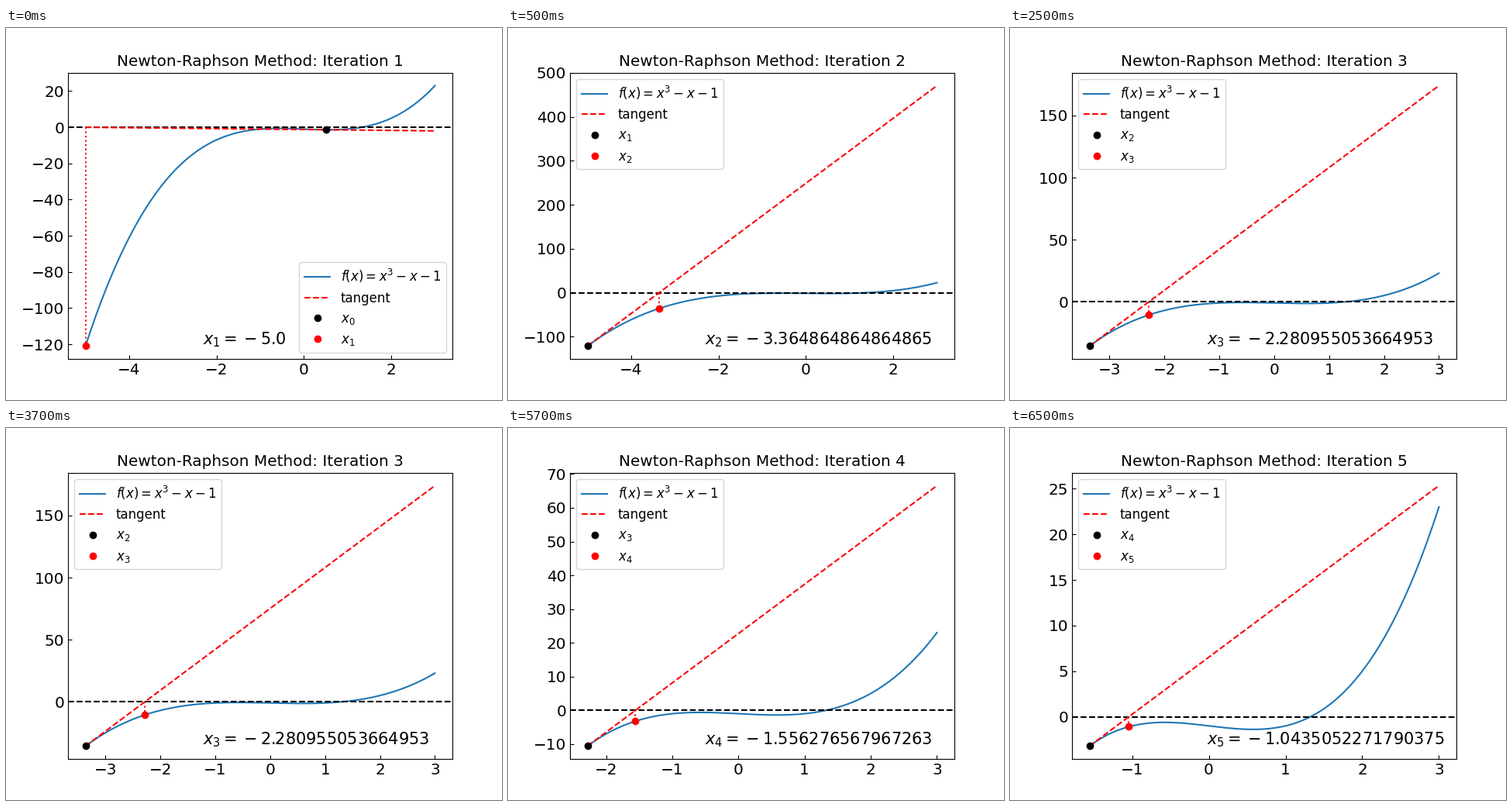
Write a matplotlib script that moves like this. It is 640x480 px and loops after 8000 ms.

```python
import numpy as np
import matplotlib.pyplot as plt
from matplotlib.animation import FuncAnimation

plt.rcParams.update({
    "font.family": "DejaVu Sans",
    "font.size": 12,
    "axes.titlesize": 14.4,
    "xtick.labelsize": 14.4,
    "ytick.labelsize": 14.4,
    "xtick.direction": "in",
    "ytick.direction": "in",
})

X_START, X_RIGHT = 0.5, 3
STEP_MS, LOOP_MS = 500, 8000


def f(x):
    return x**3 - x - 1


def slope(x):
    return 3 * x**2 - 1


def newton_iterates(x, count):
    xs = [x]
    for _ in range(count):
        xs.append(xs[-1] - f(xs[-1]) / slope(xs[-1]))
    return xs


iterates = newton_iterates(X_START, 5)
fig, ax = plt.subplots(figsize=(6.4, 4.8), dpi=100)


def draw(frame):
    # The first iteration is held for one step, the later ones for four.
    i = (frame + 3) // 4
    x0, x1 = iterates[i], iterates[i + 1]
    x = np.linspace(min(x0, x1), X_RIGHT, 200)

    ax.clear()
    ax.plot(x, f(x), label="$f(x) = x^3 - x - 1$")
    ax.axhline(0, color="k", ls="--")
    ax.plot(x, f(x0) + slope(x0) * (x - x0), "r--", label="tangent")
    ax.plot([x1, x1], [0, f(x1)], "r:")
    ax.plot(x0, f(x0), "ko", label=f"$x_{i}$")
    ax.plot(x1, f(x1), "ro", label=f"$x_{i + 1}$")

    ax.set_title(f"Newton-Raphson Method: Iteration {i + 1}")
    ax.text(0.35, 0.05, f"$x_{i + 1} = {float(x1)}$", fontsize=15,
            transform=ax.transAxes)
    ax.legend(loc="lower right" if i == 0 else "upper left")
    return ax.get_children()


anim = FuncAnimation(fig, draw, frames=LOOP_MS // STEP_MS, interval=STEP_MS,
                     init_func=lambda: draw(0), repeat=True, repeat_delay=0)
plt.show()
```
